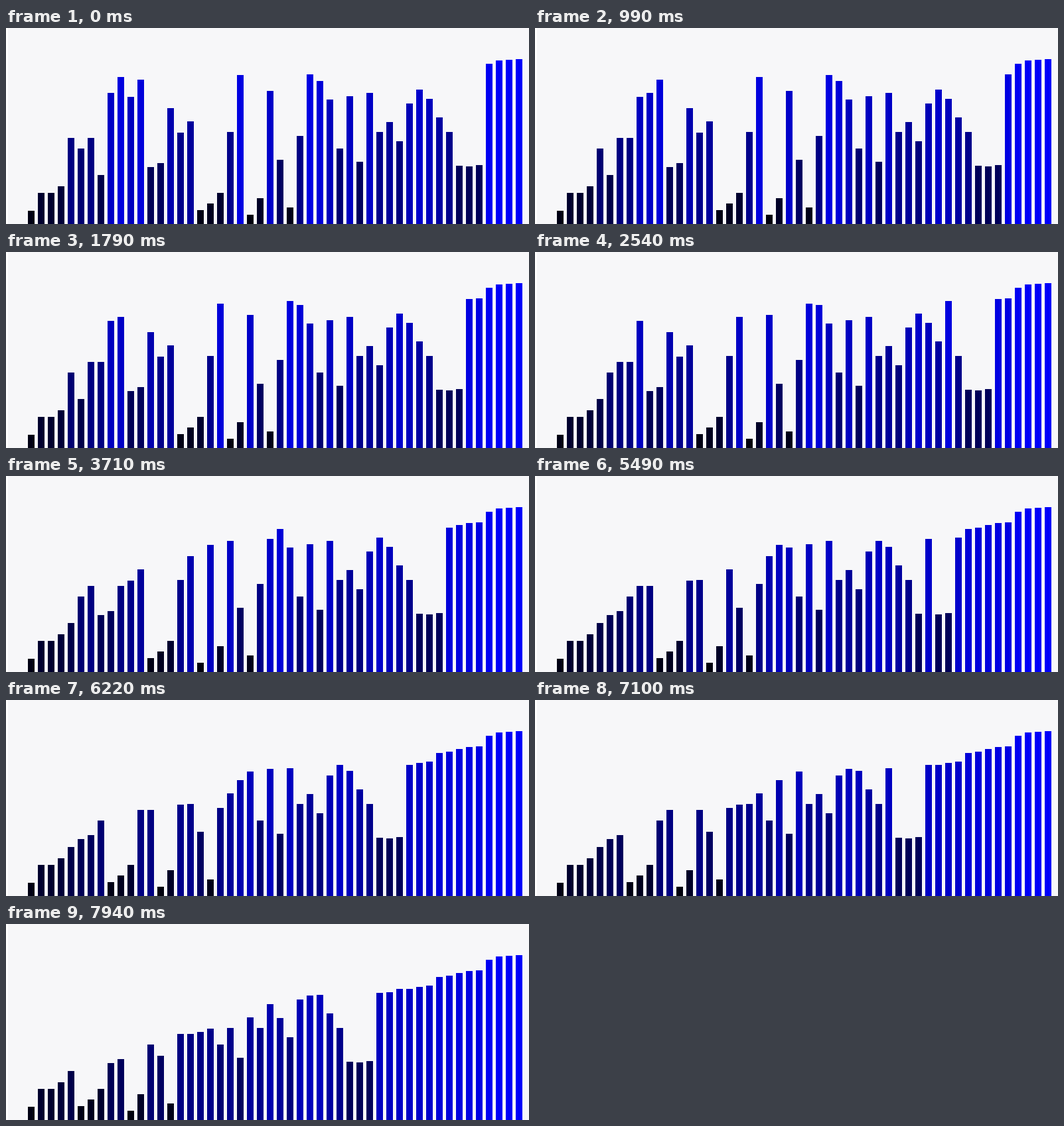
Recreate the animation shown at these times as an HTML page with a canvas. Size 788 by 296 pixels, loop 8000 ms.

```html
<!DOCTYPE html>
<html lang="en">
<head>
<meta charset="utf-8">
<title>Bubble sort</title>
<style>
  html, body { margin: 0; width: 100%; height: 100%; overflow: hidden; background: #fff; }
  canvas { display: block; }
</style>
</head>
<body>
<canvas id="stage" width="788" height="296"></canvas>
<script>
const LOOP = 8000;
const MARGIN = 3, FIRST_X = 33, PITCH = 15, BAR = 10;
const BACKGROUND = '#f7f7f9';

const heights = [
  20, 47, 47, 57, 130, 114, 130, 74, 198, 222,
  192, 218, 86, 92, 175, 138, 155, 21, 31, 47,
  139, 225, 14, 39, 201, 97, 25, 133, 226, 216,
  188, 114, 193, 94, 198, 139, 154, 125, 182, 203,
  189, 161, 139, 88, 87, 89, 242, 247, 248, 249
];

// Pace of the sort: time in ms, swaps done by then, redraws since the row before.
const pace = [
  [0, 0, 0],
  [50, 1, 1],
  [810, 31, 13],
  [990, 38, 3],
  [2540, 99, 27],
  [3710, 143, 20],
  [4740, 182, 17],
  [6220, 239, 24],
  [7940, 303, 28]
];

const lerp = (a, b, p) => a + (b - a) * p;

// One snapshot per swap; comparisons without a swap take no time.
function bubbleSort(start, maxSwaps) {
  const bars = [...start];
  const states = [start];
  for (let end = bars.length - 1; end > 0; end--) {
    for (let j = 0; j < end; j++) {
      if (bars[j] <= bars[j + 1]) continue;
      [bars[j], bars[j + 1]] = [bars[j + 1], bars[j]];
      states.push([...bars]);
      if (states.length > maxSwaps) return states;
    }
  }
  return states;
}

function buildRedraws() {
  const redraws = [{ time: 0, swaps: 0 }];
  for (let k = 1; k < pace.length; k++) {
    const [t0, s0] = pace[k - 1];
    const [t1, s1, count] = pace[k];
    for (let i = 1; i <= count; i++) {
      redraws.push({
        time: Math.round(lerp(t0, t1, i / count) / 10) * 10,
        swaps: Math.round(lerp(s0, s1, i / count))
      });
    }
  }
  return redraws;
}

const states = bubbleSort(heights, pace[pace.length - 1][1]);
const redraws = buildRedraws();
const canvas = document.getElementById('stage');
const ctx = canvas.getContext('2d');

function draw(bars) {
  const { width, height } = canvas;
  ctx.fillStyle = '#fff';
  ctx.fillRect(0, 0, width, height);
  ctx.fillStyle = BACKGROUND;
  ctx.fillRect(MARGIN, 0, width - MARGIN, height);
  bars.forEach((h, i) => {
    ctx.fillStyle = `rgb(0, 0, ${h})`;
    ctx.fillRect(FIRST_X + i * PITCH, height - h, BAR, h);
  });
}

const startTime = performance.now();

function tick() {
  const time = (performance.now() - startTime) % LOOP;
  let current = redraws[0];
  for (const r of redraws) {
    if (r.time <= time) current = r;
  }
  draw(states[current.swaps]);
  requestAnimationFrame(tick);
}

tick();
</script>
</body>
</html>
```
